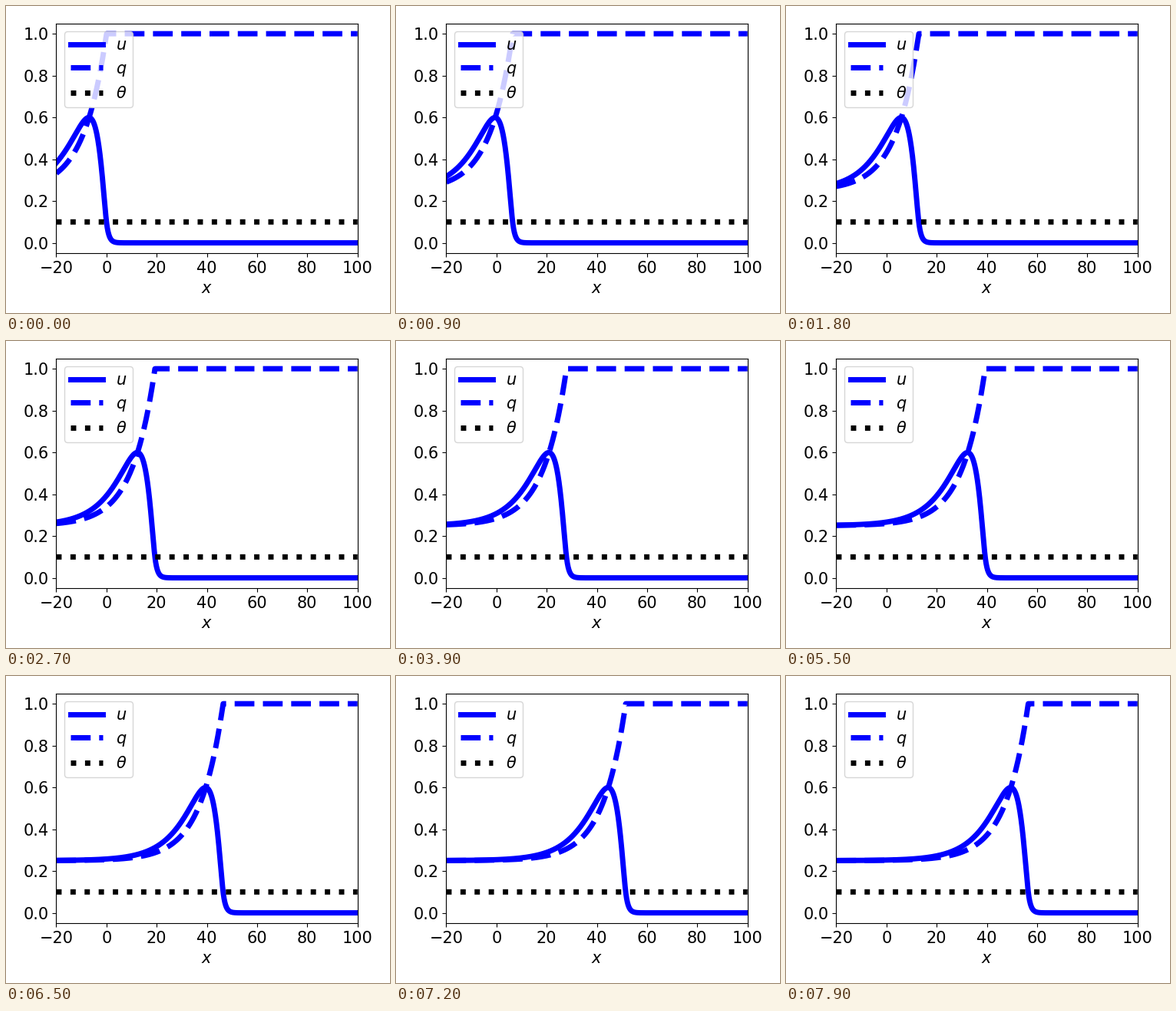
A matplotlib script that plays this animation: 500x400 px, repeating every 8000 ms.

```python
import numpy as np
import matplotlib.pyplot as plt
from matplotlib.animation import FuncAnimation

# Travelling front of a neural field with synaptic depression,
# kernel w(x) = exp(-|x|) / 2 and firing threshold THETA.
THETA, TAU, BETA = 0.1, 10, 0.3
FRAMES, INTERVAL = 80, 100
STEP = 0.715  # front displacement per frame

Q_MIN = 1 / (1 + TAU * BETA)
DROP = 1 - Q_MIN
SPEED = (3.6 + np.sqrt(3.6**2 + 0.4)) / 2
K = 1 / (Q_MIN * TAU * SPEED)

# Coefficients of the wave profile behind the front
A_K = DROP / (1 - K**2) / (1 - SPEED * K)
A_1 = (Q_MIN + DROP / (1 - K)) / 2 / (SPEED - 1)
A_C = THETA - Q_MIN - A_K - A_1


def activity(xi):
    back = np.minimum(xi, 0)
    wake = (Q_MIN + A_K * np.exp(K * back) + A_1 * np.exp(back)
            + A_C * np.exp(back / SPEED))
    return np.where(xi < 0, wake, THETA * np.exp(-np.maximum(xi, 0)))


def resource(xi):
    return Q_MIN + DROP * np.exp(K * np.minimum(xi, 0))


plt.rcParams.update({"font.family": "DejaVu Sans", "font.size": 15})
fig, ax = plt.subplots(figsize=(5, 4), dpi=100)
x = np.linspace(-20, 100, 2401)

u_line, = ax.plot(x, activity(x), "b-", lw=5, label="$u$")
q_line, = ax.plot(x, resource(x), "b--", lw=5, label="$q$")
ax.plot(x, np.full_like(x, THETA), "k:", lw=5, label=r"$\theta$")

ax.set_xlim(-20, 100)
ax.set_ylim(-0.05, 1.05)
ax.set_xticks(range(-20, 101, 20))
ax.set_xlabel("$x$")
ax.legend(loc="upper left")
fig.tight_layout()


def update(frame):
    xi = x - STEP * frame
    u_line.set_ydata(activity(xi))
    q_line.set_ydata(resource(xi))
    return u_line, q_line


anim = FuncAnimation(fig, update, frames=FRAMES, interval=INTERVAL,
                     repeat=True, repeat_delay=0)
plt.show()
```
